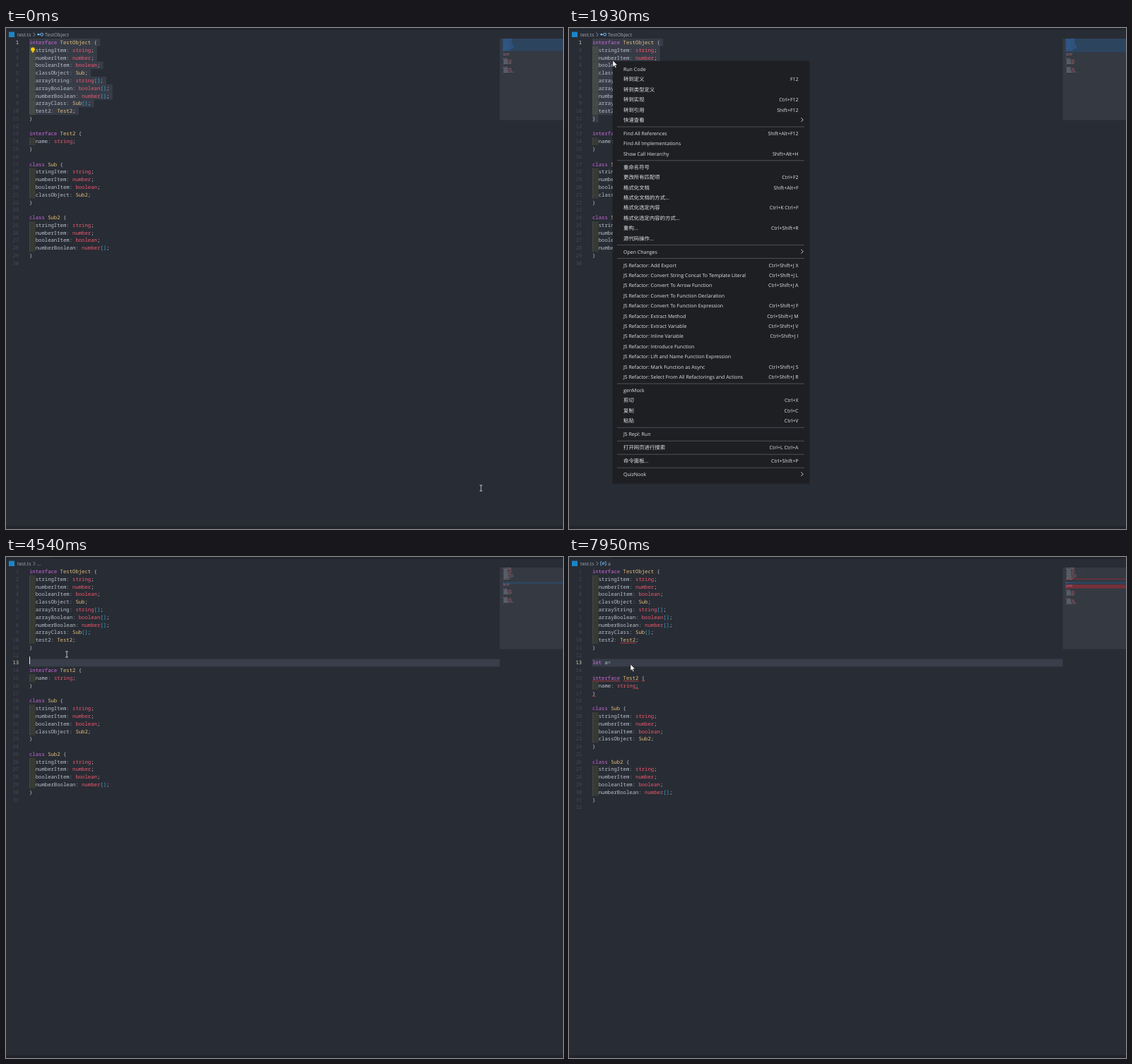
Animation, 788 px wide and 710 px high, one loop 8 s. Source, as an HTML page:

```html
<!DOCTYPE html>
<html lang="en">
<head>
<meta charset="utf-8">
<title>Editor</title>
<style>
html, body { margin: 0; width: 100%; height: 100%; overflow: hidden; background: #282c34; }
svg { display: block; width: 788px; height: 710px; }
text { white-space: pre; text-rendering: geometricPrecision; }
.mono { font: 7.27px "Noto Sans Mono", monospace; }
.ui { font: 7px "Open Sans", "Noto Sans CJK SC", "Noto Sans CJK", sans-serif; }
.cjk { font-size: 7.4px; }
</style>
</head>
<body>
<svg id="stage" viewBox="0 0 788 710" xmlns="http://www.w3.org/2000/svg"></svg>
<script>
const LOOP = 8000, TICK = 77.5;
const LEFT = 33, TOP = 15.1, LINE = 10.786, CHAR = 4.362;
const MAP_X = 702.6, MAP_LINE = 1.73, MAP_CHAR = 0.58;

const CODE = `interface TestObject {
  stringItem: string;
  numberItem: number;
  booleanItem: boolean;
  classObject: Sub;
  arrayString: string[];
  arrayBoolean: boolean[];
  numberBoolean: number[];
  arrayClass: Sub[];
  test2: Test2;
}

interface Test2 {
  name: string;
}

class Sub {
  stringItem: string;
  numberItem: number;
  booleanItem: boolean;
  classObject: Sub2;
}

class Sub2 {
  stringItem: string;
  numberItem: number;
  booleanItem: boolean;
  numberBoolean: number[];
}
`.split('\n');

// label|shortcut, ">" opens a submenu, "-" is a separator
const MENU = `Run Code
转到定义|F12
转到类型定义
转到实现|Ctrl+F12
转到引用|Shift+F12
快速查看|>
-
Find All References|Shift+Alt+F12
Find All Implementations
Show Call Hierarchy|Shift+Alt+H
-
重命名符号
更改所有匹配项|Ctrl+F2
格式化文档|Shift+Alt+F
格式化文档的方式...
格式化选定内容|Ctrl+K Ctrl+F
格式化选定内容的方式...
重构...|Ctrl+Shift+R
源代码操作...
-
Open Changes|>
-
JS Refactor: Add Export|Ctrl+Shift+J X
JS Refactor: Convert String Concat To Template Literal|Ctrl+Shift+J L
JS Refactor: Convert To Arrow Function|Ctrl+Shift+J A
JS Refactor: Convert To Function Declaration
JS Refactor: Convert To Function Expression|Ctrl+Shift+J F
JS Refactor: Extract Method|Ctrl+Shift+J M
JS Refactor: Extract Variable|Ctrl+Shift+J V
JS Refactor: Inline Variable|Ctrl+Shift+J I
JS Refactor: Introduce Function
JS Refactor: Lift and Name Function Expression
JS Refactor: Mark Function as Async|Ctrl+Shift+J S
JS Refactor: Select From All Refactorings and Actions|Ctrl+Shift+J R
-
genMock
剪切|Ctrl+X
复制|Ctrl+C
粘贴|Ctrl+V
-
JS Repl: Run
-
打开网页进行搜索|Ctrl+L Ctrl+A
-
命令面板...|Ctrl+Shift+P
-
QuizNook|>`.split('\n');

const WORDS = ('let delete clearTimeout clearInterval HTMLElement EventTarget ' +
  'Selection FileList NodeList Element isSecureContext alert').split(' ');

// Timelines: [start, value]
const ACTIVE = [[0, 1], [680, 12], [1060, 8], [1140, 4], [1220, 1], [3390, 12], [4540, 13], [4620, 14], [4850, 13]];
const SELECT = [[0, [1, 10]], [680, null], [1060, [8, 11]], [1140, [4, 11]], [1220, [1, 11]], [3390, null]];
const CRUMB = [[0, 'type'], [1060, 'none'], [1370, 'type'], [3700, 'none'], [7720, 'var']];
const BULB = [[0, 2], [910, 0], [6250, 12], [6940, 0]];
const CARET = [[0, 0], [680, 1], [1850, 0], [2850, 1], [4230, .65], [4310, .3], [4390, 0], [4540, 1], [7340, 0], [7500, 1], [7720, 0]];
const TYPED = [[0, ''], [5470, 'l'], [5550, 'le'], [5630, 'let'], [5880, 'let '], [6170, 'let a'], [6710, 'let a=']];
const POPUP = [[0, null], [5630, WORDS], [5880, null], [6560, ['arrayClass', 'arrayBoolean']], [6710, null]];
const PRESS = [[0, 0], [1060, 1], [1450, 0], [1770, 1], [1850, 0], [3310, 1], [3470, 0]];
const ARROW = [[0, 0], [1850, 1], [2850, 0], [7720, 1]];
const FOCUS = [[0, 0], [1060, 1], [1770, 0], [2850, 1]];
const MOUSE = [[0, 672, 652], [70, 650, 630], [690, 84, 135], [800, 84, 135], [900, 44, 132], [1300, 40, 115],
  [1400, 40, 115], [1560, 62, 46], [1930, 62, 46], [2320, 119, 505], [2500, 119, 505], [2620, 121, 510],
  [2930, 121, 510], [3090, 92, 136], [3300, 88, 136], [3770, 87, 137], [3930, 86, 138], [7340, 86, 138],
  [7560, 88, 146], [7720, 87, 152], [8000, 87, 152]];

const at = (list, t) => list.filter(e => e[0] <= t).pop()[1];
const lineY = n => TOP + (n - 1) * LINE;
const mapY = n => 15 + (n - 1) * MAP_LINE;
const rect = (x, y, w, h, fill, more = '') =>
  `<rect x="${x.toFixed(2)}" y="${y.toFixed(2)}" width="${w.toFixed(2)}" height="${h.toFixed(2)}" fill="${fill}" ${more}/>`;
const text = (x, y, s, fill, cls = 'mono', more = '') =>
  `<text class="${cls}" x="${x}" y="${y.toFixed(2)}" fill="${fill}" ${more}>${s}</text>`;
const stroke = (d, color, w = 1) => `<path d="${d}" fill="none" stroke="${color}" stroke-width="${w}"/>`;

function color(word) {
  if (/^(interface|class|let)$/.test(word)) return '#cf68e1';
  if (/^(string|number|boolean)$/.test(word)) return '#ef596f';
  if (/^(Test|Sub)/.test(word)) return '#e5c07b';
  if (/[[\]]/.test(word)) return '#2fa8d8';
  if (/[:=]/.test(word)) return '#8fa5b0';
  return '#bcc2cc';
}
const tokens = line => line.match(/\w+|\s+|./g) || [];

function mouseAt(t) {
  const q = Math.floor(t / TICK + .01) * TICK;
  const i = MOUSE.findIndex(p => p[0] > q);
  const a = MOUSE[i - 1], b = MOUSE[i], k = (q - a[0]) / (b[0] - a[0]);
  return [a[1] + (b[1] - a[1]) * k, a[2] + (b[2] - a[2]) * k];
}

function breadcrumb(kind) {
  const grey = '#a5abb6', blue = '#75beff', size = 'style="font-size:6.9px"';
  let s = rect(4, 5.5, 8, 7.5, '#1b86c8') + text(16, 11.7, 'test.ts', grey, 'ui', size) +
    stroke('M38.6 6.6l2.6 2.7l-2.6 2.7', grey, .8);
  if (kind === 'none') return s + text(44, 11.7, '...', grey, 'ui', size);
  if (kind === 'type') return s + `<circle cx="45.8" cy="9.2" r="1.4" fill="${blue}"/>` +
    `<circle cx="50.7" cy="9.2" r="1.9" fill="none" stroke="${blue}"/>` +
    stroke('M46 9.2h3', blue, .8) + text(55, 11.7, 'TestObject', grey, 'ui', size);
  return s + stroke('M46.3 6.6h-1.5v5.2h1.5M50.7 6.6h1.5v5.2h-1.5M47 10.4l3-2.6', blue, .8) +
    `<circle cx="48.5" cy="9.2" r="1.4" fill="none" stroke="${blue}" stroke-width=".7"/>` +
    text(55, 11.7, 'a', grey, 'ui', size);
}

function squiggle(line, from, count) {
  const n = Math.round(count * CHAR / 1.1);
  let d = `M${LEFT + from * CHAR} ${lineY(line) + 10.2}`;
  for (let i = 0; i < n; i++) d += `l1.1 ${i % 2 ? 1.1 : -1.1}`;
  return stroke(d, '#e04a4f', .8);
}

function editor(t, lines, active, sel, typed) {
  let s = '';
  if (!sel) s += rect(LEFT, lineY(active), 665.5, LINE, '#383e4a');
  lines.forEach((line, i) => {
    const n = i + 1, y = lineY(n);
    if (sel && n >= sel[0] && n <= sel[1])
      s += rect(LEFT, y, (line.length + 1) * CHAR, LINE + .1, at(FOCUS, t) ? '#404857' : '#373c47', 'rx="1"');
    if (line[0] === ' ') s += rect(LEFT, y, 2 * CHAR, LINE + .1, 'rgba(255,255,64,.07)') +
      rect(LEFT, y, .6, LINE + .1, '#4b5050');
  });
  if (at(POPUP, t) && typed === 'let a') s += rect(LEFT + 4 * CHAR, lineY(13), CHAR, LINE, '#505765');
  lines.forEach((line, i) => {
    const n = i + 1, y = lineY(n) + 7.95;
    s += text(18.2, y, n, n === active ? '#d8d3bd' : '#444b57', 'mono', 'text-anchor="end"');
    if (line) s += text(LEFT, y, tokens(line).map(w => `<tspan fill="${color(w)}">${w}</tspan>`).join(''), '#bcc2cc');
  });
  if (t >= 7110) s += squiggle(10, 9, 5) + squiggle(15, 0, 9) + squiggle(15, 10, 5) +
    squiggle(15, 16, 1) + squiggle(16, 14, 1) + squiggle(17, 0, 1);
  const bulb = at(BULB, t);
  if (bulb) {
    const y = lineY(bulb) + 4.4;
    s += `<circle cx="38" cy="${y}" r="2.8" fill="#ffcc00"/>` + rect(36.8, y + 2.3, 2.4, 2.2, '#d9b53a');
  }
  const glide = t >= 4540 && t < 4620 ? -3.4 : 0;
  return s + rect(LEFT + typed.length * CHAR, lineY(active) + glide, 1, LINE, '#e8eaf0', `opacity="${at(CARET, t)}"`);
}

function minimap(t, lines, active, sel) {
  let s = rect(698.5, 15, 89.5, 115.5, '#343942');
  if (sel) {
    const h = (sel[1] - sel[0] + 1) * MAP_LINE;
    s += rect(MAP_X, mapY(sel[0]), 86, h + .3, '#2d445e');
  } else s += rect(MAP_X, mapY(active), 86, MAP_LINE, '#2b4c6c');
  if (t >= 7110) s += rect(MAP_X, mapY(10), 86, 1.3, '#7a2f39') + rect(MAP_X, mapY(15), 86, MAP_LINE * 3, '#78303a');
  lines.forEach((line, i) => {
    const n = i + 1, y = mapY(n), on = sel && n >= sel[0] && n <= sel[1];
    if (on) s += rect(MAP_X, y, (line.length + 1) * MAP_CHAR, MAP_LINE + .1, '#2b5280');
    let x = MAP_X;
    for (const w of tokens(line)) {
      const len = w.length * MAP_CHAR;
      if (w.trim()) s += rect(x, y + .3, len, 1, color(w), `opacity="${on ? .08 : .45}"`);
      x += len;
    }
  });
  return s;
}

function menu(hover) {
  let y = 58.5, s = rect(61, 46.5, 280, 600, '#000', 'opacity=".18" rx="2"') + rect(62, 47, 277.5, 597.5, '#1e1f23');
  for (const item of MENU) {
    if (item === '-') {
      s += rect(68, y - 5.3, 265, .8, '#5a5c61');
      y += 4.6;
      continue;
    }
    const [label, key] = item.split('|');
    if (hover && label === 'genMock') s += rect(62.5, y - 7.1, 276.5, 14.2, '#2c313a');
    s += text(77, y + 2.5, label, '#e2e4e8', /[^\x00-\x7f]/.test(label) ? 'ui cjk' : 'ui');
    if (key === '>') s += stroke(`M328.4 ${y - 3.2}l2.8 2.8l-2.8 2.8`, '#e2e4e8', .9);
    else if (key) s += text(324.5, y + 2.5, key, '#e2e4e8', 'ui', 'text-anchor="end"');
    y += 14.4;
  }
  return s;
}

function popup(words) {
  const top = lineY(14) + .6, ai = words.length === 2;
  let s = rect(54, top, 245, words.length * LINE + 1, '#21252b', 'stroke="#181a1f" stroke-width=".7"') +
    rect(54.4, top + .4, 244.2, LINE, '#2c313a');
  words.forEach((w, i) => {
    const y = top + i * LINE + 5.6;
    s += `<circle cx="71" cy="${y}" r="2.3" fill="none" stroke="#c3c8d0" stroke-width=".9"/>` +
      `<circle cx="71" cy="${y}" r=".8" fill="#c3c8d0"/>` + text(79, y + 2.4, w, '#c8ccd4');
    if (ai) s += stroke(`M57.6 ${y + 3}l3.6 -3.6`, '#c3c8d0', 1.6) +
      stroke(`M62.2 ${y - 3.2}a1.9 1.9 0 1 0 1.6 2.4l-1.7 .3z`, '#c3c8d0', .9);
  });
  return ai ? s + text(293.5, top + 8, 'hintowl', '#8b919c', 'mono', 'text-anchor="end"') : s;
}

function pointer(t) {
  const [x, y] = mouseAt(t);
  let s = at(PRESS, t) ? `<circle cx="${x}" cy="${y}" r="6.3" fill="#b5ad12" opacity=".88"/>` : '';
  if (at(ARROW, t)) s += `<path transform="translate(${x} ${y})" d="M0 0v9.2l2.1-1.9l1.5 3.3l1.5-.7l-1.5-3.2h2.9z" ` +
    'fill="#fff" stroke="#111" stroke-width=".5"/>';
  else s += stroke(`M${x - 2} ${y - 4}h4M${x - 2} ${y + 4}h4M${x} ${y - 4}v8`, at(PRESS, t) ? '#7d7a20' : '#c9ccd2', .9);
  return s;
}

function scene(t) {
  const typed = at(TYPED, t), active = at(ACTIVE, t), sel = at(SELECT, t), lines = CODE.slice();
  if (t >= 4540) lines.splice(12, 0, typed);
  if (t >= 4620) lines.splice(13, 0, '');
  const words = at(POPUP, t);
  return rect(0, 0, 788, 710, '#282c34') + rect(0, 0, 788, 2.6, '#21252b') + rect(0, 0, 62, 1.4, '#2b2f38') +
    rect(0, 706, 788, 4, '#21252b') + breadcrumb(at(CRUMB, t)) +
    editor(t, lines, active, sel, typed) + minimap(t, lines, active, sel) +
    (words ? popup(words) : '') + (t >= 1850 && t < 2850 ? menu(t >= 2620) : '') + pointer(t);
}

const stage = document.getElementById('stage');
let last = '';
function draw(now) {
  const next = scene(now % LOOP);
  if (next !== last) stage.innerHTML = last = next;
}
const start = performance.now();
function loop() {
  draw(performance.now() - start);
  requestAnimationFrame(loop);
}
draw(0);
requestAnimationFrame(loop);
</script>
</body>
</html>
```
